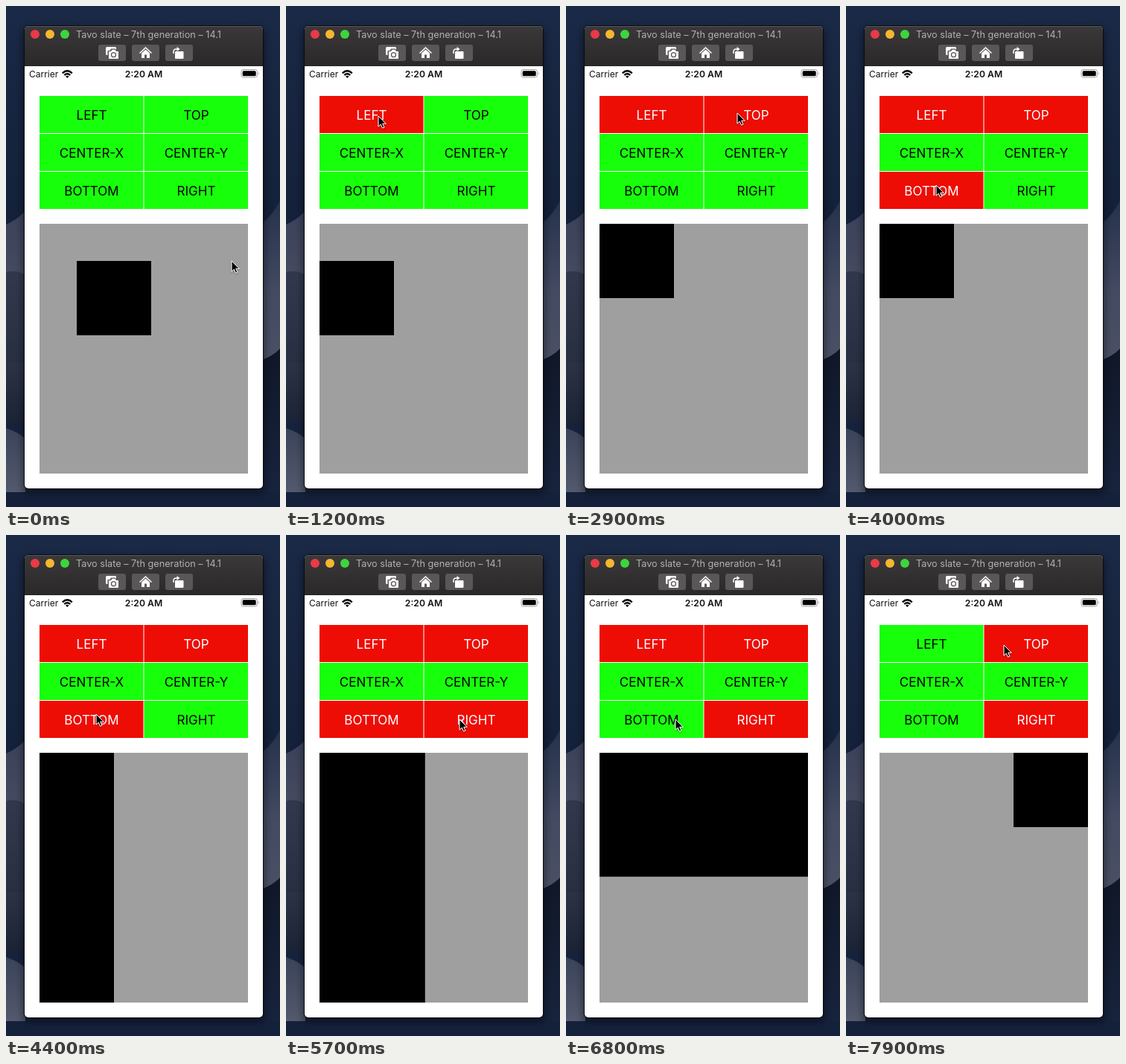
An HTML page that plays this animation: 368x674 px, repeating every 8000 ms.

```html
<!DOCTYPE html>
<html lang="en">
<head>
<meta charset="utf-8">
<title>Alignment demo</title>
<style>
  html, body { margin: 0; width: 100%; height: 100%; overflow: hidden; background: #16233d; }
  svg { display: block; width: 368px; height: 674px; }
  text { font-family: Inter, "Liberation Sans", sans-serif; }
  .title { font-size: 12.7px; fill: #b4b0b2; }
  .status { font-size: 12px; fill: #111; }
  .clock { font-size: 12.2px; font-weight: 600; text-anchor: middle; }
  .tool { fill: #595758; }
  .icon { fill: #fff; }
  .line { fill: none; stroke: #fff; stroke-width: 1.5; }
  .button rect { fill: #18ff0b; }
  .button text { font-size: 17px; text-anchor: middle; fill: #000; }
  .button.on rect { fill: #ee0d05; }
  .button.on text { fill: #fff; }
</style>
</head>
<body>
<svg viewBox="0 0 368 674">
  <defs>
    <linearGradient id="sky" x2="0" y2="1">
      <stop offset="0" stop-color="#1a2946"/>
      <stop offset=".4" stop-color="#14213a"/>
      <stop offset="1" stop-color="#17233e"/>
    </linearGradient>
    <linearGradient id="farDune" x2="0" y2="1">
      <stop offset="0" stop-color="#3a4159"/>
      <stop offset=".3" stop-color="#454a5f"/>
      <stop offset="1" stop-color="#1b2336"/>
    </linearGradient>
    <linearGradient id="nearDune" x2="0" y2="1">
      <stop offset="0" stop-color="#3b4359"/>
      <stop offset="1" stop-color="#535a6d"/>
    </linearGradient>
    <linearGradient id="rightDune" x2="0" y2="1">
      <stop offset="0" stop-color="#25314b"/>
      <stop offset=".55" stop-color="#434a61"/>
      <stop offset="1" stop-color="#4b5064"/>
    </linearGradient>
    <linearGradient id="shade" x2="0" y2="1">
      <stop offset="0" stop-color="#101727"/>
      <stop offset="1" stop-color="#18243f"/>
    </linearGradient>
    <linearGradient id="bar" x2="0" y2="1">
      <stop offset="0" stop-color="#3b383a"/>
      <stop offset="1" stop-color="#2a2829"/>
    </linearGradient>
    <filter id="soft" x="-10%" y="-10%" width="120%" height="120%">
      <feGaussianBlur stdDeviation="5"/>
    </filter>
    <filter id="drop" x="-50%" y="-50%" width="200%" height="200%">
      <feDropShadow dx="0" dy="1" stdDeviation=".8" flood-opacity=".4"/>
    </filter>
    <clipPath id="frame"><rect x="25" y="27" width="320" height="622" rx="5"/></clipPath>
  </defs>

  <!-- Desktop -->
  <rect width="368" height="674" fill="url(#sky)"/>
  <path d="M0 294Q14 288 26 276V560H0Z" fill="url(#farDune)"/>
  <path d="M0 358Q14 354 26 362V480H0Z" fill="#252d42" opacity=".6"/>
  <path d="M0 568Q14 572 26 582V655H0Z" fill="url(#nearDune)"/>
  <path d="M344 292Q358 282 368 262V480H344Z" fill="url(#rightDune)"/>
  <path d="M344 476Q358 471 368 461V674H344Z" fill="url(#shade)"/>
  <rect y="654" width="368" height="20" fill="#15213b"/>

  <!-- Window -->
  <rect x="22" y="30" width="326" height="626" rx="8" opacity=".4" filter="url(#soft)"/>
  <rect x="24" y="26" width="322" height="624" rx="6" fill="#090b10"/>
  <g clip-path="url(#frame)">
    <rect x="25" y="27" width="320" height="622" fill="#fff"/>
    <rect x="25" y="27" width="320" height="54" fill="url(#bar)"/>
    <rect x="25" y="27" width="320" height="1" fill="#5b585a"/>
  </g>
  <circle cx="39" cy="38" r="6" fill="#e93a49"/>
  <circle cx="59" cy="38" r="6" fill="#f4b72d"/>
  <circle cx="79" cy="38" r="6" fill="#3dd43d"/>
  <text class="title" x="94" y="43">Tavo slate – 7th generation – 14.1</text>

  <g class="tool">
    <rect x="124" y="52" width="37" height="22" rx="3"/>
    <rect x="169" y="52" width="37" height="22" rx="3"/>
    <rect x="214" y="52" width="37" height="22" rx="3"/>
  </g>
  <g>
    <rect class="icon" x="134" y="55" width="14" height="11" rx="1.5"/>
    <path d="M136.5 60h3l1.5-2.500h6l1.500 2.500h4v12.500h-16Z" fill="#595758"/>
    <path class="icon" d="M138 61h3l1.500-2.300h4l1.500 2.300h3v10h-13Z"/>
    <circle cx="144.500" cy="65.700" r="3" fill="#fff" stroke="#595758" stroke-width="1.300"/>
  </g>
  <path class="line" d="M179.500 63.500l8-7.500 8 7.500"/>
  <path class="icon" d="M182 63.500l5.500-5 5.500 5V70h-4v-4.500h-3V70h-4Z"/>
  <rect class="icon" x="227" y="61" width="11.500" height="10" rx="1"/>
  <path class="line" d="M225 64V61.500Q225 58 228.500 58H230"/>
  <path class="icon" d="M229.500 55l4 3-4 3Z"/>

  <!-- Status bar -->
  <text class="status" x="31" y="95.500">Carrier</text>
  <g fill="none" stroke="#000" stroke-width="2.300">
    <path d="M75.800 90.300Q82.300 84.300 88.800 90.300"/>
    <path d="M78.300 93Q82.300 89.400 86.300 93"/>
  </g>
  <path d="M80 94.600Q82.300 92.800 84.600 94.600L82.300 97Z"/>
  <text class="status clock" x="185" y="95.500">2:20 AM</text>
  <rect x="316" y="85.500" width="21.500" height="10.500" rx="3" fill="#fff" stroke="#a0a0a0"/>
  <rect x="317.700" y="87.200" width="18" height="7.100" rx="1.600"/>
  <path d="M339 89q2 1.700 0 3.500Z" fill="#a0a0a0"/>

  <g id="buttons"></g>

  <rect x="45" y="293" width="280" height="336" fill="#9f9f9f"/>
  <rect id="box"/>
  <path id="cursor" d="M0 0V14.200L3.300 11.200 5.500 16.200 7.900 15.200 5.700 10.300H10.200Z"
        stroke="#fff" stroke-width="1" stroke-linejoin="round" filter="url(#drop)"/>
</svg>

<script>
const LOOP = 8000, TICK = 100, LEAD = 30, SLIDE = 300;
const $ = id => document.getElementById(id);

const labels = ['LEFT', 'TOP', 'CENTER-X', 'CENTER-Y', 'BOTTOM', 'RIGHT'];
$('buttons').innerHTML = labels.map((label, i) => {
  const x = 45 + (i % 2) * 140.5, y = 121 + (i >> 1) * 51;
  return `<g class="button"><rect x="${x}" y="${y}" width="139.5" height="50"/>
    <text x="${x + 70}" y="${y + 31.5}">${label}</text></g>`;
}).join('');
const buttons = [...$('buttons').children];

// Each tap toggles a button and sends the box to a new x, y, width, height.
const home = [95, 343, 100, 100];
const taps = [
  { at: 854, label: 'LEFT', to: [45, 343, 100, 100] },
  { at: 1854, label: 'TOP', to: [45, 293, 100, 100] },
  { at: 4000, label: 'BOTTOM', to: [45, 293, 100, 336] },
  { at: 5604, label: 'RIGHT', to: [45, 293, 280, 336] },
  { at: 6607, label: 'BOTTOM', to: [45, 293, 280, 100] },
  { at: 7454, label: 'LEFT', to: [225, 293, 100, 100] }
];

const rest = [303, 343];
const moves = [
  { at: 0, time: 800, to: [124, 148] },
  { at: 1200, time: 400, to: [230, 144] },
  { at: 2900, time: 800, to: [121, 241] },
  { at: 5200, time: 300, to: [233, 248] },
  { at: 6100, time: 400, to: [147, 248] },
  { at: 7100, time: 300, to: [122, 151] },
  { at: 7600, time: 300, to: [212, 148] }
];

const ease = p => (1 - Math.cos(Math.PI * Math.min(1, Math.max(0, p)))) / 2;

function follow(from, steps, t) {
  return steps.reduce((pose, { at, time = SLIDE, to }) => {
    const p = ease((t - at) / time);
    return pose.map((v, i) => v + (to[i] - v) * p);
  }, from);
}

function draw(t) {
  const pose = follow(home, taps, t);
  ['x', 'y', 'width', 'height'].forEach((name, i) => $('box').setAttribute(name, pose[i]));
  $('cursor').setAttribute('transform', `translate(${follow(rest, moves, t)})`);
  buttons.forEach((button, i) => {
    const count = taps.filter(tap => tap.label === labels[i] && t >= tap.at).length;
    button.classList.toggle('on', count % 2 === 1);
  });
}

const start = performance.now() - LEAD;
function tick() {
  const t = (performance.now() - start) % LOOP;
  draw(Math.floor(t / TICK) * TICK);
  requestAnimationFrame(tick);
}
tick();
</script>
</body>
</html>
```
